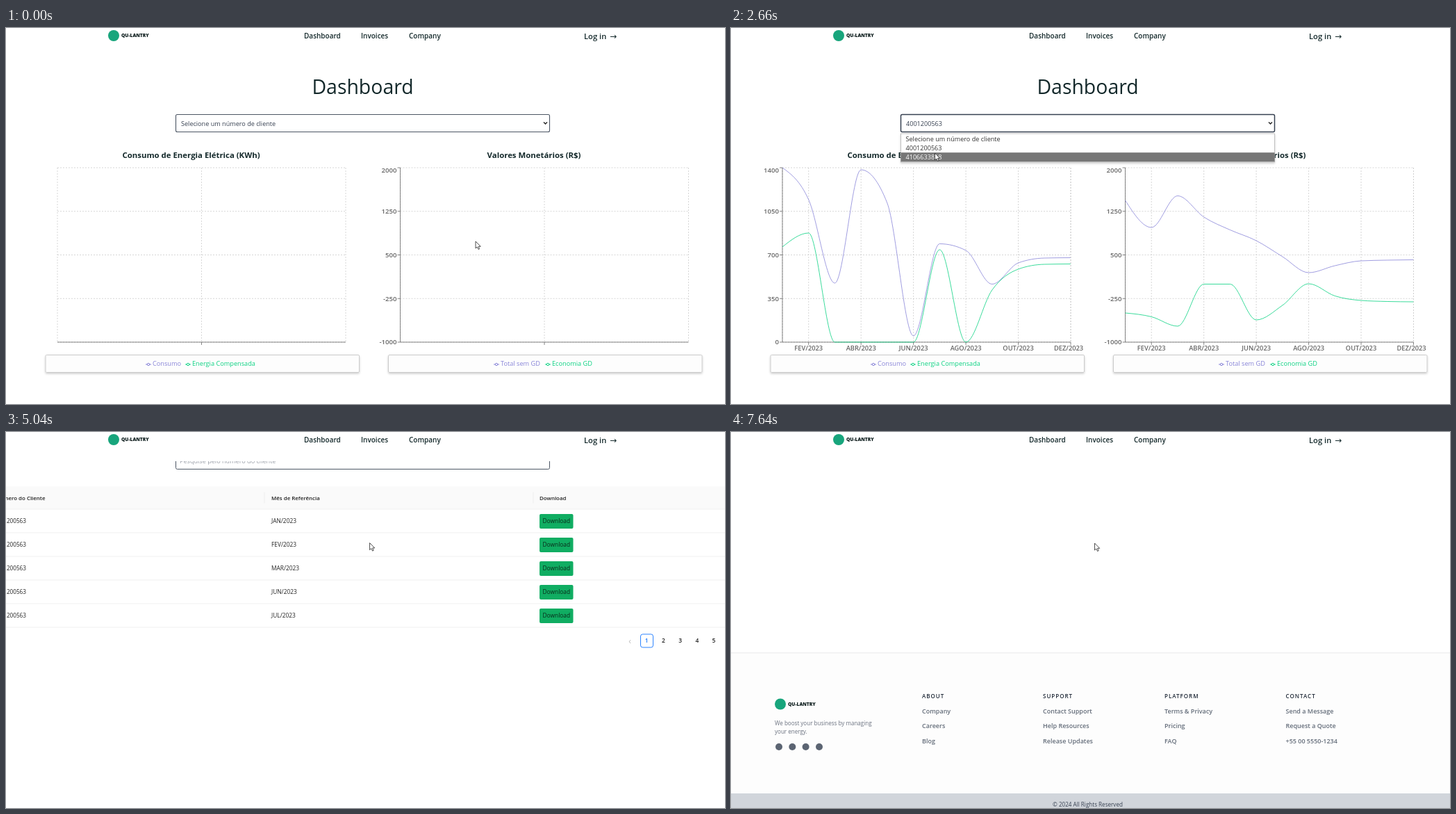
An HTML page for the animation above (8 s loop, 1035 by 541 pixels).

```html
<!DOCTYPE html>
<html lang="pt">
<head>
<meta charset="utf-8">
<title>Dashboard</title>
<style>
html, body { margin: 0; width: 100%; height: 100%; overflow: hidden; background: #fff; }
svg { display: block; font-family: "Open Sans", "Noto Sans", sans-serif; }
.grid { stroke: #ccc; stroke-width: .8; stroke-dasharray: 2 2; fill: none; }
.axis { stroke: #666; stroke-width: .8; fill: none; }
.line { fill: none; stroke-width: .8; }
</style>
</head>
<body>
<svg id="stage" width="1035" height="541" viewBox="0 0 1035 541"></svg>
<script>
const LOOP = 8000, STEP = 415 / 11, CHART_GAP = 493.5;
const PURPLE = '#8884d8', GREEN = '#0ad282', DARK = '#14292b';
const BRAND = 'QU-LANTRY';
const CLIENTS = ['Selecione um número de cliente', '4001200563', '4106633858'];
const MONTHS = ['FEV', 'ABR', 'JUN', 'AGO', 'OUT', 'DEZ'];
const ROWS = [128.5, 162.5, 196.5, 230.5, 264.5];
const LEVELS = [201, 263.75, 326.5, 389.25, 452];

// Per client: consumption, compensated energy, total, savings (heights on the stage)
const DATA = [[
  [201, 247, 367, 204, 252, 443, 310.5, 320, 368.5, 338, 331, 330.5],
  [315, 295, 452, 452, 452, 452, 319, 452, 377, 347, 340, 339.5],
  [248, 287, 241.5, 272, 290.5, 306, 329, 352, 342, 335, 334, 333.5],
  [410, 415.5, 429, 368.5, 368.5, 420, 399, 368, 385.5, 392, 393.5, 394]
], [
  [417.5, 422, 432, 417.5, 422, 372.5, 389.5, 364.5, 323.5, 296, 303, 429],
  [441, 279, 239, 294, 452, 386, 403, 389, 337, 310, 317, 443],
  [346, 355, 350.5, 350.5, 348.5, 325.5, 338.5, 334, 318, 317.5, 312, 300],
  [373, 305, 286, 303, 369, 394.5, 381.5, 386, 402, 409, 407, 419]
]];

// Markup helpers; y is the middle of the capitals
const text = (x, y, s, size, fill = DARK, weight = 400, extra = '') =>
  `<text x="${x}" y="${y + size * .36}" font-size="${size}" fill="${fill}" font-weight="${weight}" ${extra}>${s}</text>`;
const MID = 'text-anchor="middle"', END = 'text-anchor="end"';
const rect = (x, y, w, h, fill, extra = '') =>
  `<rect x="${x}" y="${y}" width="${w}" height="${h}" fill="${fill}" ${extra}/>`;
const group = (id, body, extra = '') => `<g id="${id}" ${extra}>${body}</g>`;
const path = (cls, d) => `<path class="${cls}" d="${d}"/>`;
const logo = (x, y) => `<circle cx="${x}" cy="${y}" r="8" fill="#18a57c"/>` +
  text(x + 11, y, BRAND, 6.7, '#0c1c1c', 800);
const yLabels = values => values.map((v, i) =>
  text(69, LEVELS[i] + (i ? 0 : 4), v, 9.6, '#666', 600, END)).join('');

function legend(x, label, color) {
  return `<path d="M${x} 484h8" stroke="${color}"/>` +
    `<circle cx="${x + 4}" cy="484" r="1.7" fill="#fff" stroke="${color}"/>` +
    text(x + 10, 483, label, 9.2, color);
}

function chart(i, title, titleX, legends) {
  const ticks = MONTHS.map((m, k) => ({ x: 74 + STEP * (2 * k + 1), label: m + '/2023' }));
  const yAxis = path('axis', 'M74 201V452' + LEVELS.map(y => `M70 ${y}h4`).join(''));
  const full = ticks.map((t, k) => path('grid', `M${t.x} 201V452`) + path('axis', `M${t.x} 452v4`) +
    text(k < 5 ? t.x : 486, 460.5, t.label, 9.3, '#666', 600, MID)).join('');
  const scales = i
    ? yAxis + yLabels([2000, 1250, 500, -250, -1000])
    : group('scale1', yAxis + yLabels([1400, 1050, 700, 350, 0])) +
      group('scale2', yAxis + yLabels([1800, 1350, 900, 450, 0]));
  return `<g transform="translate(${CHART_GAP * i})">` +
    text(titleX, 183, title, 11.4, DARK, 700, MID) +
    path('grid', LEVELS.map(y => `M74 ${y}H489`).join('') + 'M74 201V452M489 201V452') +
    group('empty' + i, path('grid', 'M281.5 201V452') + path('axis', 'M281.5 452v4')) +
    group('full' + i, full) + path('axis', 'M74 452H489') + scales +
    [PURPLE, GREEN].map((c, k) =>
      `<path id="line${2 * i + k}" class="line" stroke="${c}" pathLength="1"/>`).join('') +
    rect(57, 470.5, 451.5, 25, '#fdfdfd', 'rx="1.5" stroke="#ccc" filter="url(#shadow)"') +
    legends + '</g>';
}

const dashboard = text(513.5, 85, 'Dashboard', 28.4, DARK, 400, MID) +
  rect(244.5, 124.5, 538, 25, '#fff', 'id="box" rx="2"') +
  text(252, 137.5, '', 9.1, '#374151', 400, 'id="value"') +
  '<path d="M774 135.5l2.5 2.5 2.5-2.5" fill="none" stroke="#222" stroke-width="1.4"/>' +
  chart(0, 'Consumo de Energia Elétrica (KWh)', 266.5,
    legend(201, 'Consumo', PURPLE) + legend(258, 'Energia Compensada', GREEN)) +
  chart(1, 'Valores Monetários (R$)', 266.5,
    legend(208.5, 'Total sem GD', PURPLE) + legend(282.5, 'Economia GD', GREEN)) +
  group('menu', rect(244.5, 152, 538, 41, '#fff', 'stroke="#b5b5b5" stroke-width=".8" filter="url(#shadow)"') +
    rect(244.5, 0, 538, 13.2, '#767676', 'id="hover"') +
    CLIENTS.map((c, k) => text(251.5, 160 + 13.1 * k, c, 9.1, '#333', 400, `id="option${k}"`)).join(''));

const tableRow = (y, k) =>
  text(29, y, CLIENTS[1], 8.2, '#222', 400, END) +
  text(382, y, ['JAN', 'FEV', 'MAR', 'JUN', 'JUL'][k] + '/2023', 8.35, '#222') +
  rect(768, y - 10, 48.5, 21, '#10ad62', 'rx="2"') +
  text(792.3, y + .5, 'Download', 8.4, '#0a2a1a', 400, MID) +
  rect(0, y + 16.5, 1035, 1, '#f0f0f0');

const pages = text(898, 301, '‹', 12, '#bbb', 400, MID) +
  rect(913.5, 291.5, 18, 19, '#fff', 'rx="3" stroke="#1677ff" stroke-width=".9"') +
  [1, 2, 3, 4, 5].map(n => text(898 + 24.2 * n, 301, n, 8.4, n < 2 ? '#1677ff' : '#222', 600, MID)).join('');

const COLUMNS = [
  [275, 'ABOUT', 'Company', 'Careers', 'Blog'],
  [449, 'SUPPORT', 'Contact Support', 'Help Resources', 'Release Updates'],
  [624, 'PLATFORM', 'Terms &amp; Privacy', 'Pricing', 'FAQ'],
  [798.5, 'CONTACT', 'Send a Message', 'Request a Quote', '+55 00 5550-1234']
];
const footer = rect(0, 317, 1035, 203, '#fdfdfd') + rect(0, 317, 1035, 1.5, '#f0f0f1') + logo(71, 391.5) +
  text(63, 419.5, 'We boost your business by managing', 8.05, '#6b7280') +
  text(63, 431.5, 'your energy.', 8.05, '#6b7280') +
  [69, 88.3, 107.6, 127].map(x => `<circle cx="${x}" cy="453" r="5" fill="#5b6472"/>`).join('') +
  COLUMNS.map(([x, head, ...links]) => text(x, 380.5, head, 8, '#1f2937', 600, 'letter-spacing="1"') +
    links.map((s, k) => text(x, 401.5 + 21.6 * k, s, 9, '#636c79', 600)).join('')).join('') +
  rect(0, 520, 1035, 30, '#d1d5db') +
  text(513.5, 536, '© 2024 All Rights Reserved', 8.1, '#374151', 400, MID);

const SCROLL_MID = 126.7, SCROLL_END = 500, SETTLE = .6;
const invoices = text(513.5, -10, 'Invoices', 28.4, DARK, 400, MID) +
  rect(244.5, 29.5, 538, 24.5, '#fff', 'rx="2" stroke="#4b5563"') +
  text(250, 42, 'Pesquise pelo número do cliente', 9.1, '#9a9fa8') +
  rect(0, 79, 1035, 32, '#fafafa') + rect(0, 111, 1035, 1, '#f0f0f0') +
  rect(371.5, 87, 1, 16, '#eee') + rect(758.5, 87, 1, 16, '#eee') +
  text(56.5, 95.5, 'Número do Cliente', 7.9, '#222', 600, END) +
  text(382, 95.5, 'Mês de Referência', 7.9, '#222', 600) +
  text(768, 95.5, 'Download', 7.9, '#222', 600) +
  group('rows', ROWS.map(tableRow).join('') + pages) +
  `<g transform="translate(0 ${SCROLL_END - 95})">${footer}</g>`;

const stage = document.getElementById('stage');
stage.innerHTML = `<defs><filter id="shadow" x="-5%" y="-20%" width="110%" height="160%">
  <feDropShadow dx="0" dy="1.5" stdDeviation="1.5" flood-opacity=".2"/></filter></defs>` +
  group('dashboard', dashboard) + group('invoices', invoices) +
  rect(0, 0, 1035, 42, '#fff') + logo(155, 11) +
  text(429, 11.5, 'Dashboard', 10, DARK, 600) + text(511, 11.5, 'Invoices', 10, DARK, 600) +
  text(580, 11.5, 'Company', 10, DARK, 600) + text(832, 12, 'Log in', 11.2, DARK, 600) +
  text(869, 12, '→', 12, DARK, 400, 'font-family="DejaVu Sans, sans-serif"') +
  group('cursor', '<path d="M0 0V10L2.3 8 4 11.5 5.6 10.8 4.1 7.3H7.2Z" fill="#fff" stroke="#222" stroke-width=".8"/>');

const el = {};
stage.querySelectorAll('[id]').forEach(n => el[n.id] = n);
const show = (id, on) => el[id].style.display = on ? '' : 'none';
const set = (id, attrs) => { for (const k in attrs) el[id].setAttribute(k, attrs[k]); };

const clamp = v => Math.max(0, Math.min(1, v));
const span = (t, a, b) => clamp((t - a) / (b - a));
const mix = (a, b, p) => a + (b - a) * p;
const smooth = p => p * p * (3 - 2 * p);
const easeOut = p => p * (2 - p);

// cubic-bezier(.25, .1, .25, 1)
function ease(x) {
  let lo = 0, hi = 1;
  const bez = (a, b, u) => 3 * a * u * (1 - u) ** 2 + 3 * b * u * u * (1 - u) + u ** 3;
  for (let i = 0; i < 20; i++) {
    const u = (lo + hi) / 2;
    if (bez(.25, .25, u) < x) lo = u; else hi = u;
  }
  return bez(.1, 1, lo);
}

// Monotone cubic through evenly spaced points
function monotone(ys) {
  const s = ys.slice(1).map((y, i) => y - ys[i]);
  const m = ys.map((_, i) => i && i < 11
    ? (Math.sign(s[i - 1]) + Math.sign(s[i])) *
      Math.min(Math.abs(s[i - 1]), Math.abs(s[i]), Math.abs(s[i - 1] + s[i]) / 4)
    : 0);
  m[0] = (3 * s[0] - m[1]) / 2;
  m[11] = (3 * s[10] - m[10]) / 2;
  let d = `M74 ${ys[0]}`;
  for (let i = 0; i < 11; i++) {
    const x = 74 + STEP * i;
    d += `C${x + STEP / 3} ${ys[i] + m[i] / 3} ${x + STEP * 2 / 3} ${ys[i + 1] - m[i + 1] / 3} ${x + STEP} ${ys[i + 1]}`;
  }
  return d;
}

const MOVES = [
  [20, 676, 307], [400, 211, 90], [630, 266, 140], [820, 266, 140], [1350, 276, 170],
  [1680, 276, 170], [2350, 298, 142], [2460, 298, 142], [2650, 293.5, 180], [3220, 293.5, 180],
  [4040, 538, 17], [4440, 538, 17], [5060, 523.5, 160]
];
function cursorAt(t) {
  const i = MOVES.findIndex(k => k[0] > t);
  if (i < 1) return MOVES[i ? MOVES.length - 1 : 0].slice(1);
  const [a, b] = [MOVES[i - 1], MOVES[i]], p = smooth(span(t, a[0], b[0]));
  return [mix(a[1], b[1], p), mix(a[2], b[2], p)];
}

function scrollAt(t) {
  if (t < 5340) return SCROLL_MID * easeOut(span(t, 4920, 5160));
  return mix(SCROLL_MID, SCROLL_END - SETTLE, smooth(span(t, 5340, 5540))) +
    SETTLE * (span(t, 7030, 7180) + span(t, 7480, 7640)) / 2;
}

function drawDashboard(t, cursorY) {
  const client = t < 1490 ? 0 : t < 3140 ? 1 : 2;
  const open = (t >= 600 && t < 1490) || (t >= 2460 && t < 3140);
  const loaded = t >= 1540, second = t >= 3200;
  el.value.textContent = CLIENTS[client];
  set('box', open ? { stroke: '#374151', 'stroke-width': 1.5 }
    : client ? { stroke: '#111', 'stroke-width': 1.7 } : { stroke: '#4b5563', 'stroke-width': 1.1 });

  show('menu', open);
  const hover = cursorY < 153 ? client : Math.min(2, Math.floor((cursorY - 153) / 13.1));
  set('hover', { y: 153 + 13.1 * hover });
  CLIENTS.forEach((_, k) => set('option' + k, { fill: k === hover ? '#fff' : '#333' }));

  for (const i of [0, 1]) {
    show('empty' + i, !loaded);
    show('full' + i, loaded);
  }
  show('scale1', loaded && !second);
  show('scale2', second);

  const drawn = ease(span(t, 1540, 2690)), morph = ease(span(t, 3200, 4250));
  for (let k = 0; k < 4; k++) {
    show('line' + k, loaded);
    set('line' + k, {
      d: monotone(DATA[0][k].map((y, i) => mix(y, DATA[1][k][i], morph))),
      'stroke-dasharray': drawn < 1 ? `${drawn} 2` : 'none'
    });
  }
}

function frame(now) {
  const t = now % LOOP, [x, y] = cursorAt(t), onInvoices = t >= 4080;
  show('dashboard', !onInvoices);
  show('invoices', onInvoices);
  if (onInvoices) {
    show('rows', t >= 4440);
    set('invoices', { transform: `translate(0 ${95 - scrollAt(t)})` });
  } else drawDashboard(t, y);
  set('cursor', { transform: `translate(${x} ${y})` });
  requestAnimationFrame(frame);
}
frame(performance.now());
</script>
</body>
</html>
```
